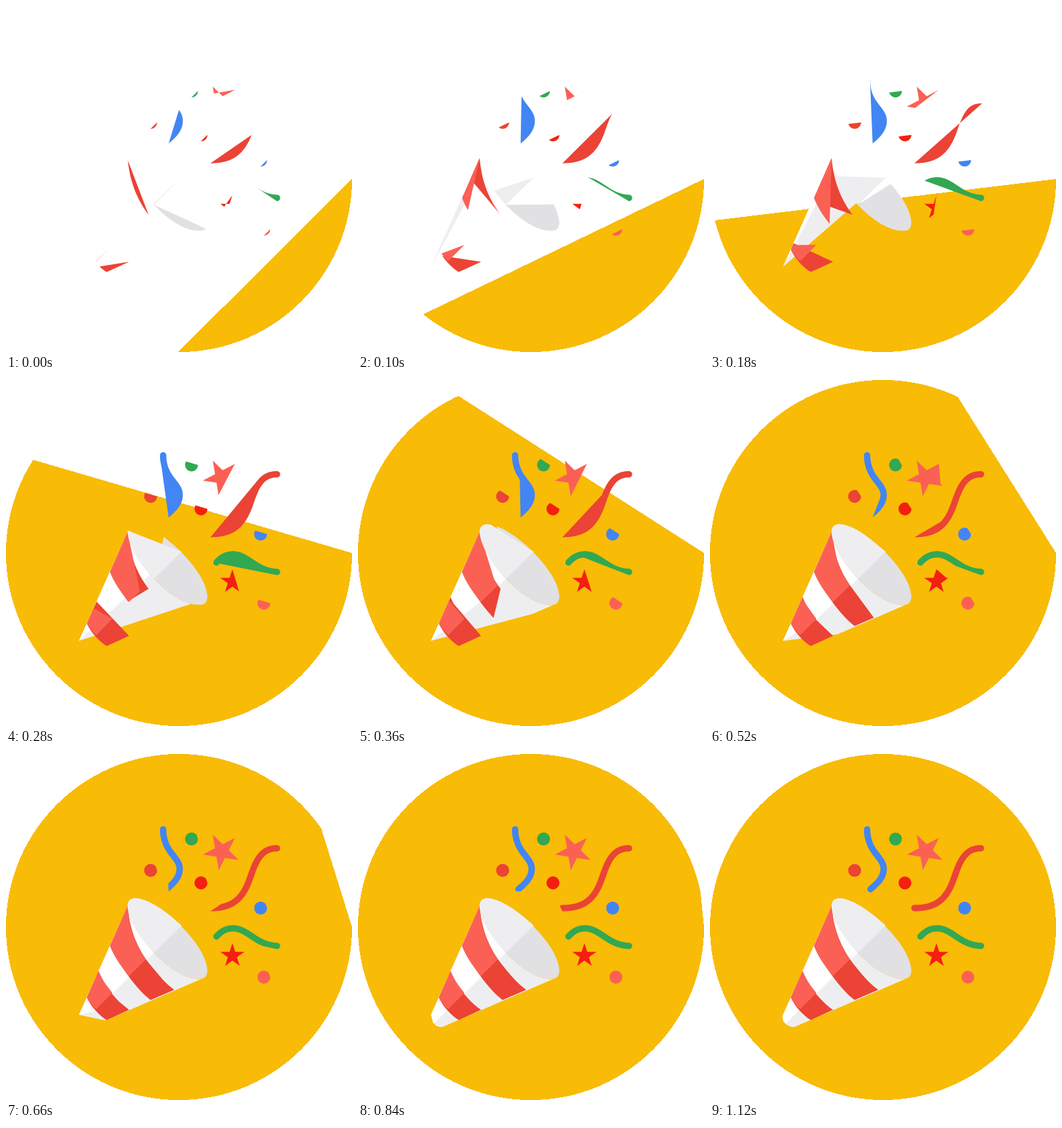
Write an HTML page that moves like this. It is 512 px wide and 512 px high and loops after 1600 ms.

```html
<!DOCTYPE html>
<html lang="en">
<head>
<meta charset="utf-8">
<title>Party popper</title>
<style>
  html, body { margin: 0; width: 100%; height: 100%; overflow: hidden; background: #fff; }
  svg { display: block; width: 100%; height: 100%; }
</style>
</head>
<body>
<svg id="stage" viewBox="0 0 512 512"></svg>
<script>
const LOOP = 1600, DRAW = 1120, START = 0.25;
const YELLOW = '#f8bb06', RED = '#eb4335', CORAL = '#fb6055', SCARLET = '#f51f0f',
      GREEN = '#32a852', BLUE = '#4285f4', LIGHT = '#eeeef0', GREY = '#e1e1e3';
const stage = document.getElementById('stage');
const shapes = [];

function makePath(d) {
  const path = document.createElementNS('http://www.w3.org/2000/svg', 'path');
  path.setAttribute('d', d);
  return path;
}

const at = (path, length) => {
  const { x, y } = path.getPointAtLength(length);
  return x.toFixed(2) + ' ' + y.toFixed(2);
};

// Registers a filled outline together with evenly spaced points along it.
function add(fill, d, step = 0.5) {
  const path = makePath(d), guide = makePath(d);
  path.setAttribute('fill', fill);
  stage.append(path);
  const length = guide.getTotalLength(), points = [];
  for (let s = 0; s < length; s += step) points.push(at(guide, s));
  shapes.push({ path, guide, d, length, points, step });
  return path;
}

function disc(fill, x, y, r, step) {
  return add(fill, `M${x + r} ${y}a${r} ${r} 0 1 1 ${-2 * r} 0a${r} ${r} 0 1 1 ${2 * r} 0z`, step);
}

function star(fill, x, y, r, degrees) {
  const corners = Array.from({ length: 10 }, (_, i) => {
    const a = (degrees - 36 * i) * Math.PI / 180, q = i % 2 ? r * 0.382 : r;
    return `${x + q * Math.cos(a)} ${y + q * Math.sin(a)}`;
  });
  add(fill, `M${corners.join('L')}Z`, 0.25);
}

// Outlines a round-capped ribbon around a centre line.
function ribbon(fill, centre, capFirst) {
  const h = 4.7, line = makePath(centre), length = line.getTotalLength(), n = 60;
  const right = [], left = [];
  for (let i = 0; i <= n; i++) {
    const s = length * i / n, p = line.getPointAtLength(s);
    const a = line.getPointAtLength(Math.max(0, s - 0.5));
    const b = line.getPointAtLength(Math.min(length, s + 0.5));
    const k = h / Math.hypot(b.x - a.x, b.y - a.y);
    const nx = (a.y - b.y) * k, ny = (b.x - a.x) * k;
    right.push(`${p.x + nx} ${p.y + ny}`);
    left.unshift(`${p.x - nx} ${p.y - ny}`);
  }
  const cap = `A${h} ${h} 0 0 0 `;
  const sides = right.join('L') + cap + left.join('L');
  add(fill, capFirst ? `M${left[n]}${cap}${sides}Z` : `M${sides}${cap}${right[0]}Z`);
}

disc(YELLOW, 256, 256, 256, 2).setAttribute('shape-rendering', 'crispEdges');

// Cone
add(LIGHT, 'M108 386L180 225C181 261 246 338 290 332.5L127 403C120 407 104 398 108 386Z');
add('#fff', 'M108 386L180 225C180.5 243 197 271.3 218.9 294.3L112 399Q106 394 108 386Z');
add(RED, 'M211 309C192 284 182.5 256 180 225L154 284C165 307 191 347 214 364L249 349C235 339 222 323 211 309Z');
add(CORAL, 'M180 225L154 284C159 298 169 313 182 328.5L207 303.8C191 283 182.5 256 180 225Z');
add(RED, 'M182 378.6L149 393.7C138 387 126 374 119.7 360.5L137 321.3C146 343.5 164 366.5 182 378.6Z');
add(CORAL, 'M157.5 353.4L133.5 377.5C128 372.5 124 367.5 119.7 360.5L137 321.3C142 333.5 149 343.5 157.5 353.4Z');

// Mouth
add(GREY, 'M218.9 294.3C240.8 317.4 268 335.3 290 332.3C297.6 331 299.6 322 296.5 312' +
  'C290 277 226 215 192 213.4C184 213.4 180 217 180 225C180.5 243 197 271.3 218.9 294.3Z');
add(LIGHT, 'M260 254L218.9 294.3C197 271.3 180.5 243 180 225C180 217 184 213.4 192 213.4C211 214.6 236.5 232 260 254Z');

// Confetti
ribbon(BLUE, 'M237.5 200C243 195 257 185 257 170C257 152 233 146 232.5 111.5');
ribbon(RED, 'M302.5 228C335 228 350 215 361 184C370 157 378 139.5 401 139.5');
ribbon(GREEN, 'M401 284C370 283 358 258 336 258C324 258 317 264 311.5 270', true);
star(CORAL, 319, 144.2, 28.2, -45.5);
star(SCARLET, 335, 298.6, 18.6, -90);
disc(GREEN, 274.5, 125.7, 9.5);
disc(RED, 214, 172.2, 9.5);
disc(SCARLET, 288.5, 190.7, 9.5);
disc(BLUE, 376.8, 228, 9.5);
disc(CORAL, 381.6, 330.2, 9.5);

// Cubic Bezier easing, solved by bisection.
function ease(x) {
  const curve = (s, a, b) => 3 * (1 - s) * (1 - s) * s * a + 3 * (1 - s) * s * s * b + s * s * s;
  let low = 0, high = 1;
  for (let i = 0; i < 30; i++) {
    const mid = (low + high) / 2;
    if (curve(mid, 0.203, 0.356) < x) low = mid; else high = mid;
  }
  return curve(low, 0.25, 1);
}

function draw(time) {
  const t = Math.min(1, time % LOOP / DRAW);
  const part = START + (1 - START) * ease(t);
  for (const { path, guide, d, length, points, step } of shapes) {
    const end = part * length;
    const trimmed = points.slice(0, Math.floor(end / step) + 1);
    path.setAttribute('d', t < 1 ? `M${trimmed.join('L')}L${at(guide, end)}Z` : d);
  }
}

const begin = performance.now();
function tick() {
  draw(performance.now() - begin);
  requestAnimationFrame(tick);
}
tick();
</script>
</body>
</html>
```
